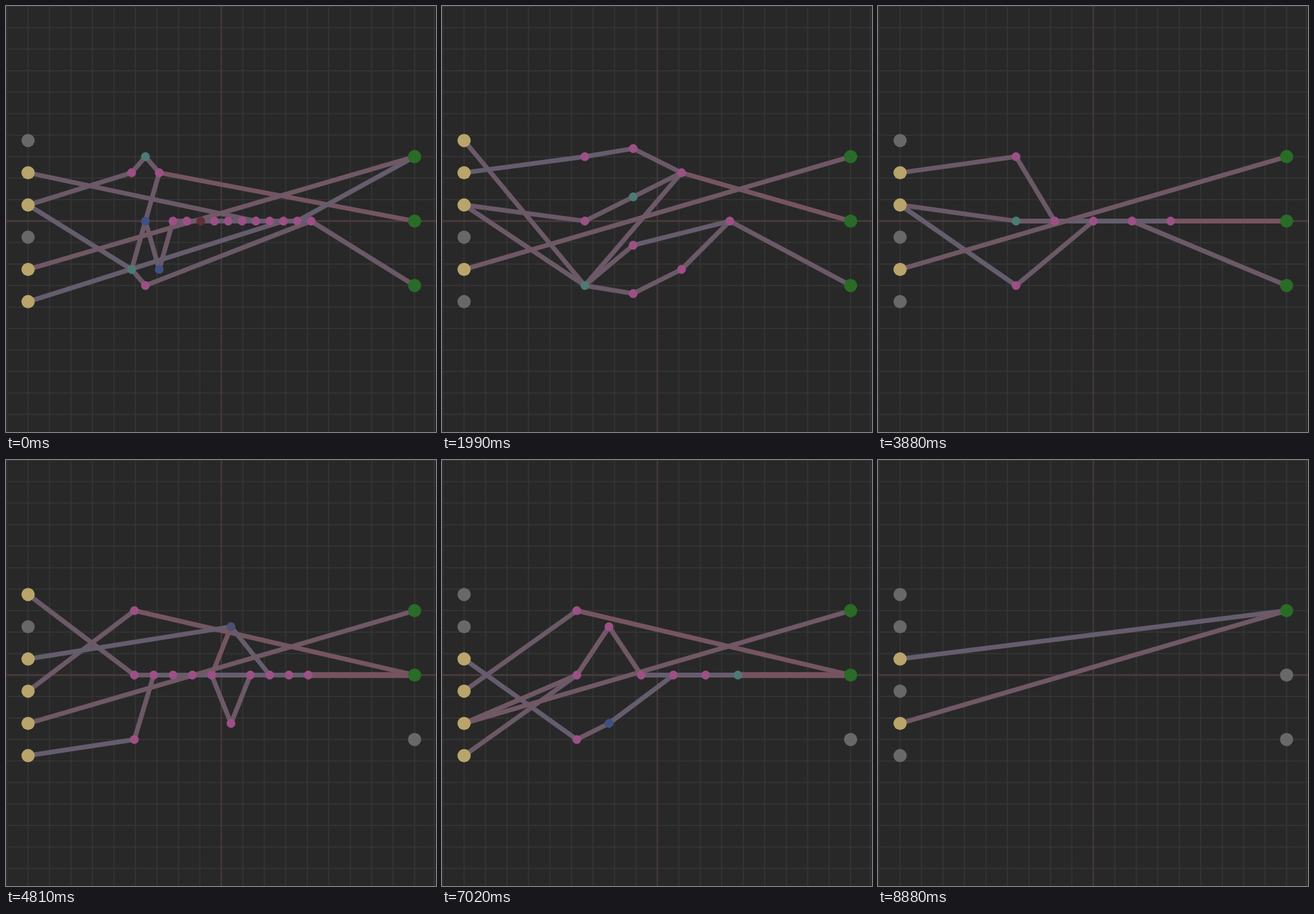
Recreate the animation shown at these times as an HTML page with a canvas. Size 623 by 617 pixels, loop 9.28 s.

```html
<!DOCTYPE html>
<html lang="en">
<head>
<meta charset="utf-8">
<title>Evolving network</title>
<style>
  html, body { margin: 0; width: 100%; height: 100%; overflow: hidden; background: #282828; }
  canvas { display: block; }
</style>
</head>
<body>
<canvas id="stage" width="623" height="617"></canvas>
<script>
const ctx = document.getElementById('stage').getContext('2d');
const W = 623, H = 617, CX = 312, CY = 311.5, SPAN = 280, LOOP = 9280;
const GRID = SPAN / 9;

const EDGE = { m: '#6b5967', b: '#655d6d', r: '#755560', R: '#775361', p: '#705865' };
const NODE = { pink: '#9c5086', t: '#4d7b74', b: '#405082', d: '#602f38', s: '#4c5074' };
const OFF = '#686868', INPUT = '#b9a56b', OUTPUT = '#296b27';

// Column a holds the inputs, z the outputs, b.. the hidden layers.
// layers: nodes per hidden column; edges: from, to, tone; "e-o" links a run of single nodes.
const stages = [
  { at: 0, layers: '23211111111111', tints: 'c0t b1t c1b d1b g0d',
    edges: 'a1k0m a2b0m a2b1b b0c0m c0d0m d0z1r c1d0m b1c1m c1d1m d1e0m b1c2m c2o0m a5m0b n0z0b o0z2m e-o' },
  { at: 1330, layers: '321111', tints: 'b2t c0t',
    edges: 'a1b0m a2b1m a2b2m b0c0m b1c0m b2c1m c0z1r c1e0m c0d0m d-g g0z2m' },
  { at: 1990, layers: '3421', tints: 'b2t c1t',
    edges: 'a0b2m a1b0b b0c0b c0d0m a2b1m b1c1m c1d0m a2b2m b2d0m b2c2m c2e0b b2c3m c3d1m d1e0m e0z2m d0z1r' },
  { at: 2460, layers: '311111', tints: '',
    edges: 'a0b1m a1b0m a5b2b b0d0m b1c0m b2c0m c-g g0z1r' },
  { at: 2990, layers: '11111', tints: '',
    edges: 'a1b0b b-f f0z1p' },
  { at: 3480, layers: '1111', tints: '',
    edges: 'a1b0m a5c0b b-e d0z2m e0z1p' },
  { at: 3880, layers: '31111', tints: 'b1t',
    edges: 'a1b0m a2b1m a2b2b b0c0m b1c0m b2d0m c-f e0z2m f0z1r' },
  { at: 4340, layers: '321111', tints: 'b1t',
    edges: 'a1b0m a2b1m a2b2b b0z1r b1c0m c0d0m b2c1m c1e0m d-g g0z2m' },
  { at: 4810, layers: '3111121111', tints: 'g0s',
    edges: 'a0b1m a3b0m b0z1r a2g0b a5b2b b2c0m b1c0m c-f f0g0r f0g1m g1h0m g0i0b f0h0b h-k k0z1R' },
  { at: 5210, layers: '32111111', tints: 'b2b',
    edges: 'a0b1m a3b0b b0z1r a2b2m a5b2m b1c0m c0e0r b2c1m c1d0m d-i i0z1r' },
  { at: 5680, layers: '3211111', tints: 'b0d b1d b2b d0b',
    edges: 'a0b1m a3b0b b0z1r a2b2m b2c1m c1d0m b1c0m c0f0r d-h h0z1r' },
  { at: 6150, layers: '32111111', tints: 'b2b',
    edges: 'a0b1m a3b0m b0z1r a2b2m b2c1m c1e0m b1c0m c0d0m d-i i0z1r' },
  { at: 6550, layers: '3211111', tints: 'c1b',
    edges: 'a0b1m a3b0m b0z1r a2b2b a5b1m b2c1m c1e0m b1c0m c0d0m d-h h0z1R' },
  { at: 7020, layers: '321111', tints: 'c1b g0t',
    edges: 'a3b0m b0z1r a2b2b b2c1m c1e0b a4b1p a5b1m b1c0p c0d0p d-g g0z1R' },
  { at: 7420, layers: '321111', tints: 'c1b',
    edges: 'a0b1m a3b0m b0z1r a2b2b a5b2m b2c1m c1d0m b1c0m c0e0m d-g g0z1R' },
  { at: 7950, layers: '32111', tints: 'b1t',
    edges: 'a0b1m a3b0m b0z1r a2b2m b2c1m c1d0m b1c0m c0d0m d-f f0z1r' },
  { at: 8420, layers: '3111', tints: '',
    edges: 'a0b0m a1b1m a5b2b b0c0m b1c0m b2d0m c-e d0z2m e0z1r' },
  { at: 8880, layers: '', tints: '', edges: 'a2z0b' }
];

const words = s => s.split(' ').filter(Boolean);
const next = col => String.fromCharCode(col.charCodeAt(0) + 1);

function expand(word) {
  if (word[1] !== '-') return [word];
  const run = [];
  for (let c = word[0]; c < word[2]; c = next(c)) run.push(c + '0' + next(c) + '0b');
  return run;
}

function build(spec) {
  const nodes = new Map();
  const addColumn = (col, x, count) => {
    for (let i = 0; i < count; i++) {
      nodes.set(col + i, { x, y: CY - SPAN / 2 + SPAN / count * (i + 0.5), r: 6.4, color: NODE.pink });
    }
  };
  addColumn('a', CX - SPAN, 6);
  let col = 'b';
  [...spec.layers].forEach((count, i, all) => {
    addColumn(col, CX - SPAN / 2 + SPAN / all.length * (i + 0.5), +count);
    col = next(col);
  });
  addColumn('z', CX + SPAN, 3);

  const edges = [...words(spec.edges).flatMap(expand), 'a4z0p'].map(e => ({
    from: e.slice(0, 2), to: e.slice(2, 4), tone: e[4]
  }));
  const used = new Set(edges.flatMap(e => [e.from, e.to]));
  for (const [id, n] of nodes) {
    if (id[0] !== 'a' && id[0] !== 'z') continue;
    n.r = 9.6;
    n.color = !used.has(id) ? OFF : id[0] === 'a' ? INPUT : OUTPUT;
  }
  for (const t of words(spec.tints)) nodes.get(t.slice(0, 2)).color = NODE[t[2]];
  return { at: spec.at, nodes, edges };
}

const nets = stages.map(build);

function line(x1, y1, x2, y2, color, width) {
  ctx.strokeStyle = color;
  ctx.lineWidth = width;
  ctx.beginPath();
  ctx.moveTo(x1, y1);
  ctx.lineTo(x2, y2);
  ctx.stroke();
}

function drawGrid() {
  ctx.fillStyle = '#282828';
  ctx.fillRect(0, 0, W, H);
  for (let k = -10; k <= 10; k++) {
    if (!k) continue;
    const x = Math.min(CX + k * GRID, 620.5), y = CY + k * GRID;
    line(x, 0, x, H, '#363636', 1.5);
    line(0, y, W, y, '#363636', 1.5);
  }
  line(CX, 0, CX, H, '#46383a', 2);
  line(0, CY, W, CY, '#46383a', 3);
}

function drawNet({ nodes, edges }) {
  for (const e of edges) {
    const a = nodes.get(e.from), b = nodes.get(e.to);
    line(a.x, a.y, b.x, b.y, EDGE[e.tone], e.tone === 'R' ? 8.5 : 6.8);
  }
  for (const n of nodes.values()) {
    ctx.fillStyle = n.color;
    ctx.beginPath();
    ctx.arc(n.x, n.y, n.r, 0, Math.PI * 2);
    ctx.fill();
  }
}

const start = performance.now();
function frame() {
  const t = (performance.now() - start) % LOOP;
  drawGrid();
  drawNet(nets.filter(n => n.at <= t).pop());
  requestAnimationFrame(frame);
}
frame();
</script>
</body>
</html>
```
